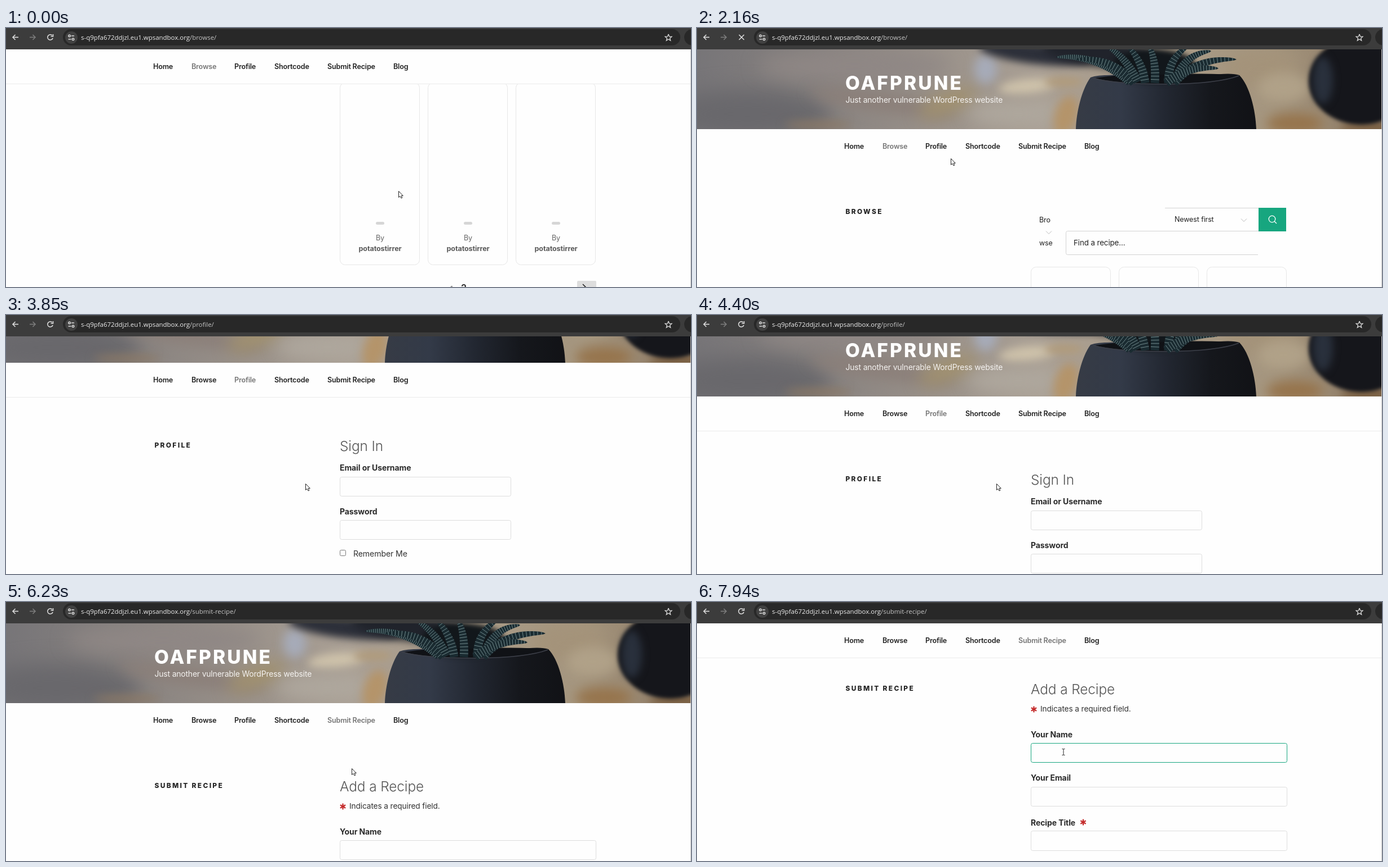
An HTML page with a canvas for the animation above (8 s loop, 1215 px wide and 461 px high).

```html
<!DOCTYPE html>
<html lang="en">
<head>
<meta charset="utf-8">
<title>Recipe site walkthrough</title>
<style>
html, body { margin: 0; width: 100%; height: 100%; overflow: hidden; background: #fefefe; }
canvas { display: block; width: 1215px; height: 461px; }
</style>
</head>
<body>
<canvas id="stage" width="1215" height="461"></canvas>
<script>
const W = 1215, H = 461, LOOP = 8000, TOP = 38, BANNER = 142;
const INK = '#222', GREY = '#767676', GREEN = '#17a67f', RED = '#c42b2b', EDGE = '#ddd';
const ctx = document.getElementById('stage').getContext('2d');

// Each key holds until the next: [time, value, ...]
const scrollKeys = [[0, 328], [840, 220], [970, 62], [1090, 9], [1220, 1], [1350, 0],
  [3420, 1], [3570, 60], [3700, 95], [4400, 35], [4550, 0],
  [6880, 25], [7000, 95], [7120, 150], [7240, 173]];
const cursorKeys = [[0, 'arrow', 696, 290], [140, 'arrow', 690, 308], [260, 'arrow', 682, 330],
  [1220, 'arrow', 676, 342], [1350, 'arrow', 643, 373], [1500, 'arrow', 590, 330],
  [1620, 'arrow', 500, 262], [1740, 'arrow', 434, 232], [1890, 'hand', 424, 214],
  [2160, 'arrow', 450, 232], [2280, 'arrow', 490, 260], [2400, 'arrow', 519, 279],
  [2550, 'arrow', 520, 280], [2840, 'arrow', 522, 287], [3570, 'arrow', 526, 293],
  [3700, 'arrow', 528, 297], [3850, 'arrow', 531, 300], [4700, 'arrow', 490, 262],
  [4820, 'arrow', 451, 228], [4970, 'hand', 436, 216], [5120, 'hand', 482, 214],
  [5240, 'hand', 530, 214], [5360, 'hand', 600, 215], [5510, 'hand', 606, 207],
  [5800, 'arrow', 625, 240], [5950, 'arrow', 618, 268], [6080, 'arrow', 614, 292],
  [6230, 'arrow', 613, 296], [7000, 'arrow', 616, 294], [7120, 'arrow', 630, 280],
  [7240, 'beam', 645, 270], [7390, 'beam', 650, 267]];
const urlKeys = [[0, '/browse/'], [2700, '/profile/'], [5950, '/submit-recipe/']];
const pageKeys = [[0, 'Browse'], [2840, 'Profile'], [6230, 'Submit Recipe']];
const hoverKeys = [[0, ''], [1890, 'Profile'], [2160, ''], [5240, 'Shortcode'], [5360, ''],
  [5510, 'Submit Recipe'], [5800, '']];
const menu = [['Home', 261], ['Browse', 329], ['Profile', 405], ['Shortcode', 476],
  ['Submit Recipe', 570], ['Blog', 687]];

const keyAt = (keys, t) => keys.findLast(k => k[0] <= t);
const within = (t, a, b) => t >= a && t < b;

// y is the middle of the capital letters
function text(str, x, y, size, { weight = 400, color = INK, gap = -0.12, family = 'Inter', align = 'left' } = {}) {
  ctx.font = `${weight} ${size}px "${family}", sans-serif`;
  ctx.letterSpacing = gap + 'px';
  ctx.textAlign = align;
  ctx.fillStyle = color;
  ctx.fillText(str, x, Math.round(y + size * 0.36));
  return ctx.measureText(str).width;
}

function rect(x, y, w, h, color) {
  ctx.fillStyle = color;
  ctx.fillRect(x, y, w, h);
}

function frame(x, y, w, h, r, color = EDGE) {
  ctx.strokeStyle = color;
  ctx.lineWidth = 1;
  ctx.beginPath();
  ctx.roundRect(x + 0.5, y + 0.5, w - 1, h - 1, r);
  ctx.stroke();
}

function pill(x, y, w, h, r, color) {
  ctx.fillStyle = color;
  ctx.beginPath();
  ctx.roundRect(x, y, w, h, r);
  ctx.fill();
}

function line(points, color, width = 1) {
  ctx.strokeStyle = color;
  ctx.lineWidth = width;
  ctx.beginPath();
  points.forEach(([x, y], i) => i ? ctx.lineTo(x, y) : ctx.moveTo(x, y));
  ctx.stroke();
}

function ring(x, y, r, color, width, from = 0, to = Math.PI * 2) {
  ctx.strokeStyle = color;
  ctx.lineWidth = width;
  ctx.beginPath();
  ctx.arc(x, y, r, from, to);
  ctx.stroke();
}

function asterisk(x, y) {
  for (let i = 0; i < 3; i++) {
    const a = Math.PI / 2 + i * Math.PI / 3, dx = 5.4 * Math.cos(a), dy = 5.4 * Math.sin(a);
    line([[x - dx, y - dy], [x + dx, y + dy]], RED, 2.3);
  }
}

const chevron = (x, y) => line([[x - 5, y - 2.5], [x, y + 2.5], [x + 5, y - 2.5]], '#bbb');

// A striped leaf that narrows along a quadratic curve from base to tip
function leaf(c, [x0, y0, cx, cy, x1, y1]) {
  const steps = 40, left = [], right = [];
  for (let i = 0; i <= steps; i++) {
    const u = i / steps, v = 1 - u;
    const x = v * v * x0 + 2 * u * v * cx + u * u * x1;
    const y = v * v * y0 + 2 * u * v * cy + u * u * y1;
    const a = Math.atan2(v * (cy - y0) + u * (y1 - cy), v * (cx - x0) + u * (x1 - cx));
    const half = 7.5 * Math.sqrt(1 - u * u);
    left.push([x + half * Math.sin(a), y - half * Math.cos(a)]);
    right.push([x - half * Math.sin(a), y + half * Math.cos(a)]);
  }
  c.fillStyle = '#1a2b31';
  c.beginPath();
  [...left, ...right.reverse()].forEach(p => c.lineTo(...p));
  c.fill();
  right.reverse();
  c.strokeStyle = '#71898b';
  c.lineWidth = 1;
  const spacing = Math.max(1, Math.round(steps * 5 / Math.hypot(x1 - x0, y1 - y0)));
  for (let i = spacing; i < steps; i += spacing) {
    c.beginPath();
    c.moveTo(...left[i]);
    c.lineTo(...right[i]);
    c.stroke();
  }
}

// Soft rendering of the header picture, painted once
function paintBanner() {
  const art = document.createElement('canvas');
  art.width = W;
  art.height = BANNER;
  const c = art.getContext('2d');
  const fade = (x0, y0, x1, y1, ...colors) => {
    const g = c.createLinearGradient(x0, y0, x1, y1);
    colors.forEach((col, i) => g.addColorStop(i / (colors.length - 1), col));
    return g;
  };
  const blob = (x, y, rx, ry, color, blur = 12, turn = 0) => {
    c.filter = `blur(${blur}px)`;
    c.fillStyle = color;
    c.beginPath();
    c.ellipse(x, y, rx, ry, turn, 0, 7);
    c.fill();
    c.filter = 'none';
  };
  c.fillStyle = fade(0, 0, W, 0, '#777578', '#86817f', '#989089', '#aaa095', '#a99b88', '#a5967f', '#8d7a64');
  c.fillRect(0, 0, W, BANNER);
  blob(90, 115, 150, 45, '#69686c', 18);
  blob(280, 30, 170, 24, '#8f8785', 16);
  blob(215, 134, 60, 6, '#8c7863', 8);
  blob(330, 95, 130, 16, '#8b7f79', 12, 0.15);
  blob(445, 95, 55, 20, '#a0906f', 14, -0.4);
  blob(512, 35, 20, 26, '#a6abb9', 9);
  blob(600, 8, 100, 18, '#2c2f39', 7, 0.12);
  blob(720, 8, 110, 24, '#20232b', 7, 0.12);
  blob(585, 66, 50, 13, '#cfc3ab', 8, -0.1);
  blob(570, 114, 90, 22, '#aea79d', 14);
  blob(654, 118, 20, 36, '#b4946a', 8, 0.3);
  blob(650, 58, 34, 9, '#b09b7c', 7);
  blob(1000, 35, 65, 34, '#a4937a', 12);
  blob(1040, 68, 45, 26, '#b0a188', 10);
  blob(1060, 132, 50, 18, '#96744c', 10);
  blob(1190, 138, 50, 8, '#765a3c', 7);
  blob(1178, 56, 93, 78, '#15161b', 3);
  blob(1110, 55, 18, 42, '#29303c', 7);

  c.fillStyle = fade(672, 0, 992, 0, '#363b45', '#333a48', '#222731', '#15171c', '#111216');
  c.fill(new Path2D('M672 142C673 112 682 72 698 50Q712 45 745 46H905Q950 41 962 46C980 64 991 108 992 142Z'));
  blob(810, 30, 75, 30, '#12171b', 5);
  c.fillStyle = '#101216';
  c.fill(new Path2D('M706 51Q760 43 832 45Q920 41 958 47Q925 60 832 61Q740 61 706 51Z'));
  c.strokeStyle = '#3c3f48';
  c.lineWidth = 1.5;
  c.stroke(new Path2D('M702 51Q740 62 832 62Q925 61 961 47'));

  const leaves = [[768, 58, 710, 8, 637, 14], [775, 60, 735, 12, 672, 18], [782, 58, 760, 12, 728, -4],
    [795, 60, 790, 20, 762, -8], [812, 60, 815, 18, 800, -10], [836, 60, 835, 14, 875, -8],
    [848, 58, 862, 8, 912, 3], [846, 60, 885, 14, 957, 18], [832, 60, 870, 28, 925, 34]];
  leaves.forEach(l => leaf(c, l));
  return art;
}
const banner = paintBanner();

function drawBrowse() {
  text('Bro', 607, 341, 12.5);
  text('wse', 607, 382, 12.5);
  chevron(624, 364);
  ctx.strokeStyle = '#d3d3d3';
  ctx.lineWidth = 1;
  ctx.stroke(new Path2D('M995 361.5H657.5Q654.5 361.5 654.5 364.5V400.5Q654.5 403.5 657.5 403.5H995'));
  text('Find a recipe...', 668, 382.5, 13.4);
  line([[830, 320.5], [996, 320.5]], '#d3d3d3');
  line([[830, 361.5], [996, 361.5]], '#d3d3d3');
  text('Newest first', 847, 340.5, 12.5);
  chevron(970, 342);
  rect(996, 320, 49, 42, GREEN);
  ring(1020, 340, 5.8, '#fff', 1.3);
  line([[1024, 344], [1028, 348]], '#fff', 1.3);

  for (const x of [592, 748, 904]) {
    frame(x, 425, 142, 325, 9, '#e7e7e7');
    pill(x + 64, 673, 15, 5, 2.5, '#d6d6d6');
    text('By', x + 71.5, 701.5, 12.6, { color: '#666', align: 'center' });
    text('potatostirrer', x + 71.5, 720, 12.6, { weight: 700, color: '#5a5a5a', align: 'center' });
  }
  text('1', 788, 791, 11, { weight: 500, color: GREY });
  text('2', 807, 790, 16, { weight: 600 });
  pill(1013, 778, 34, 30, 2, '#ddd');
  line([[1023, 784], [1030, 791], [1023, 798]], INK, 1.6);
}

function label(str, y) {
  text(str, 592, y, 14, { weight: 700, color: '#2b2b2b', gap: -0.1 });
}

function title(str) {
  text(str, 592, 328.5, 24.4, { weight: 300, color: '#555', gap: -0.1 });
}

function drawProfile() {
  title('Sign In');
  label('Email or Username', 367);
  frame(592, 383, 304, 35, 3);
  label('Password', 444.5);
  frame(592, 460, 304, 35, 3);
  frame(592, 513, 11, 11, 2, '#777');
  text('Remember Me', 616, 520, 14.1, { color: '#333' });
}

function drawSubmit(t) {
  title('Add a Recipe');
  asterisk(597.5, 364);
  text('Indicates a required field.', 609, 363.5, 13.7, { color: '#333' });
  label('Your Name', 409);
  frame(592, 424, 455, 35, 3, t >= 7390 ? GREEN : EDGE);
  if (within(t, 7510, 7940)) rect(606, 433, 1, 17, INK);
  label('Your Email', 486);
  frame(592, 502, 455, 35, 3);
  label('Recipe Title', 565.5);
  asterisk(685, 565);
  frame(592, 580, 455, 36, 3);
}

function drawPage(t) {
  const scroll = keyAt(scrollKeys, t)[1], page = keyAt(pageKeys, t)[1], hover = keyAt(hoverKeys, t)[1];
  ctx.save();
  ctx.translate(0, -scroll);
  ctx.drawImage(banner, 0, TOP);
  text('OAFPRUNE', 263, 98, 33.5, { weight: 800, color: '#fff', gap: 3.1 });
  text('Just another vulnerable WordPress website', 263.5, 128, 13.9, { color: '#f4f2f0', gap: -0.16 });
  text(page.toUpperCase(), 263.5, 327, 11.9, { weight: 800, gap: 2.35 });
  if (page === 'Browse') drawBrowse();
  else if (page === 'Profile') drawProfile();
  else drawSubmit(t);
  ctx.restore();

  // The menu sticks below the browser bar
  const navY = Math.max(TOP, TOP + BANNER - scroll);
  rect(0, navY, W, 62, '#fefefe');
  if (scroll > 20) rect(0, navY + 61, W, 1, '#ebebeb');
  if (within(t, 4970, 6230)) rect(432, 242, 52, 1, '#eee');
  for (const [name, x] of menu) {
    const dim = name === page || name === hover;
    text(name, x, navY + 30.5, 12.6, { weight: 600, color: dim ? GREY : INK, gap: -0.2 });
  }
  rect(1214, TOP, 1, H, '#c9c9c9');
}

function arrowIcon(x, dir, color) {
  line([[x - 5, 16.5], [x + 5, 16.5]], color, 1.6);
  line([[x + dir * 0.5, 12], [x + 5 * dir, 16.5], [x + dir * 0.5, 21]], color, 1.6);
}

function drawBar(t) {
  const light = '#dedede';
  rect(0, 0, W, TOP, '#3c3c3c');
  pill(101, 2, 1095, 29, 14.5, '#282828');
  pill(1203, 2, 40, 29, 14.5, '#282828');
  arrowIcon(17, -1, light);
  arrowIcon(47, 1, '#7d7d7d');
  if (within(t, 2160, 2840) || within(t, 5660, 6230)) {
    line([[74.5, 12], [83.5, 21]], light, 1.6);
    line([[83.5, 12], [74.5, 21]], light, 1.6);
  } else {
    ring(78.5, 16.5, 4.7, light, 1.6, 0.3, 5.5);
    line([[83.5, 11], [83.5, 15], [79.5, 15]], light, 1.6);
  }
  pill(105, 6, 22, 22, 11, '#414141');
  ring(112.5, 14, 1.8, light, 1.4);
  line([[116, 14], [121, 14]], light, 1.5);
  line([[110.5, 20], [115.5, 20]], light, 1.5);
  ring(119, 20, 1.8, light, 1.4);

  const font = { family: 'Open Sans', gap: 0, color: '#ececec' };
  const used = text('s-q9pfa672ddjzl.eu1.wpsandbox.org', 133, 17, 11.45, font);
  text(keyAt(urlKeys, t)[1], 133 + used, 17, 11.45, { ...font, color: '#c4c4c4' });

  const star = Array.from({ length: 11 }, (_, i) => {
    const a = -Math.PI / 2 + i * Math.PI / 5, r = i % 2 ? 2.7 : 6.2;
    return [1175 + r * Math.cos(a), 17.3 + r * Math.sin(a)];
  });
  line(star, light, 1.3);
}

const shapes = {
  arrow: new Path2D('M.5 .5V11.5L3 9.3L5 13L6.8 12.2L5.1 8.6H8.3Z'),
  hand: new Path2D('M4 9V2Q4 .6 5.2 .6Q6.4 .6 6.4 2V6.5Q7.8 5.6 8.6 7Q10 6.3 10.6 7.6Q12.2 7.2 12.2 9V12Q12.2 14 11 16.5H5.2Q4 14 1 10.5Q.6 8.8 2.2 8.8Z'),
  beam: new Path2D('M-2.5 -5.5H-.8L0 -4.8L.8 -5.5H2.5M0 -4.8V4.8M-2.5 5.5H-.8L0 4.8L.8 5.5H2.5')
};

function drawCursor(t) {
  const [, kind, x, y] = keyAt(cursorKeys, t);
  ctx.save();
  ctx.translate(x, y);
  ctx.lineWidth = 1;
  ctx.strokeStyle = '#222';
  ctx.fillStyle = '#fff';
  if (kind !== 'beam') ctx.fill(shapes[kind]);
  ctx.stroke(shapes[kind]);
  ctx.restore();
}

function draw() {
  const t = performance.now() % LOOP;
  rect(0, 0, W, H, '#fefefe');
  drawPage(t);
  drawBar(t);
  drawCursor(t);
  requestAnimationFrame(draw);
}
draw();
</script>
</body>
</html>
```
